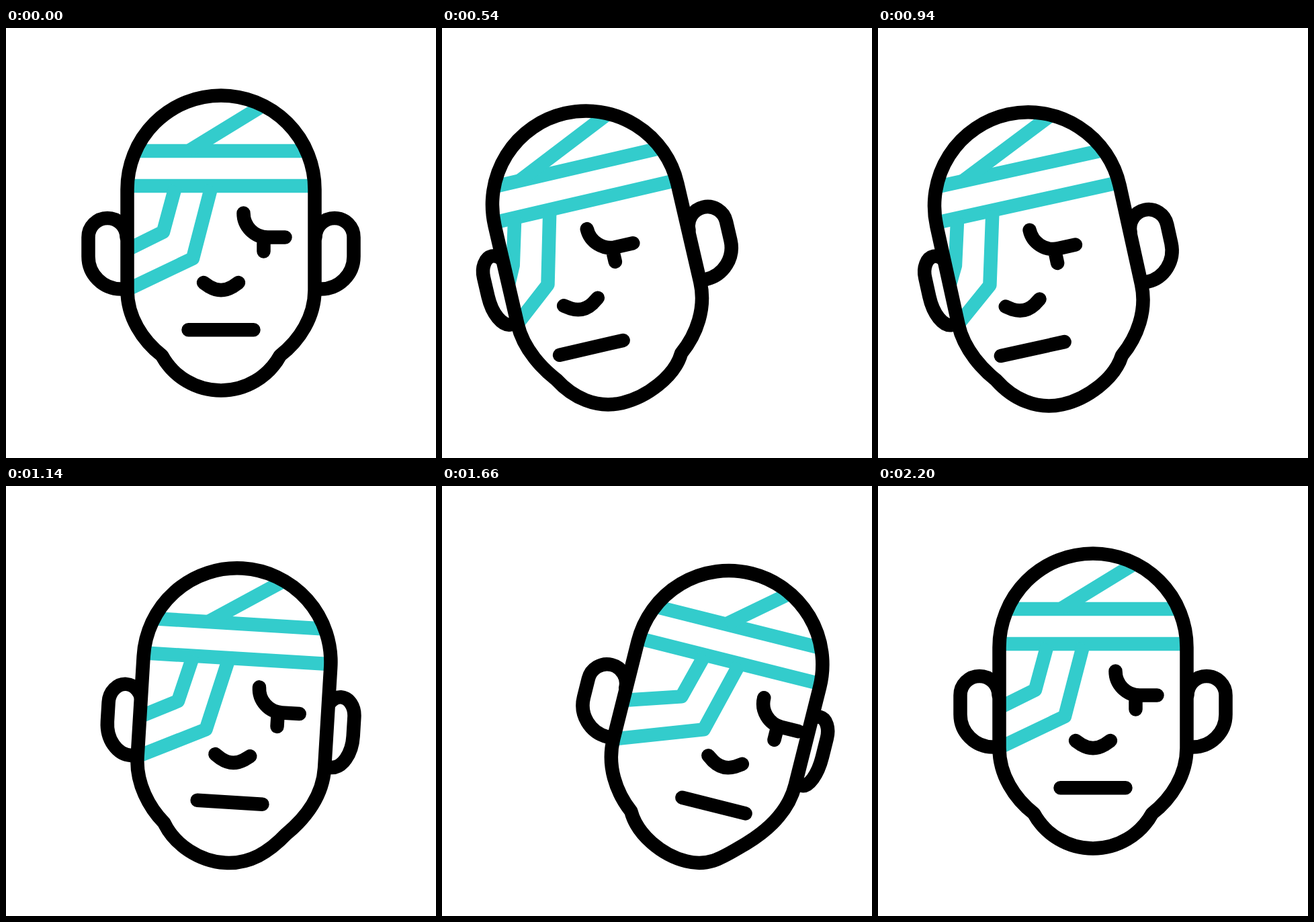
Recreate the animation shown at these times as an HTML page. Size 640 by 640 pixels, loop 2.4 s.

```html
<!DOCTYPE html>
<html lang="en">
<head>
<meta charset="utf-8">
<title>Bandaged head</title>
<style>
  html, body { margin: 0; width: 100%; height: 100%; overflow: hidden; background: #fff; }
  svg { display: block; width: 100%; height: 100%; }
  path { fill: none; stroke: #000; stroke-width: 20.5; stroke-linecap: round; stroke-linejoin: round; }
  #skull { fill: #fff; stroke: none; }
  #tape path { stroke: #3cc; stroke-linecap: butt; }
</style>
</head>
<body>
<svg viewBox="0 0 640 640">
  <clipPath id="inside"><path id="mask"/></clipPath>
  <g id="head">
    <path id="earL"/>
    <path id="earR"/>
    <path id="skull"/>
    <g id="tape" clip-path="url(#inside)">
      <path d="M-150-57H150M-150-5H150"/>
      <path id="strips"/>
    </g>
    <path id="face" d="M33.5 35.5A36 36 0 0 0 69.5 71.5H95.5M63.5 71.5V92.5
      M-26 139L-17 145.2Q0 155.2 17 145.2L26 139M-48.5 209.2H48.5"/>
    <path id="outline"/>
  </g>
</svg>
<script>
const LOOP = 2400, STEP = 20, REST = 2200;
const KEYS = [0, 745, 1500, 2220];
const R = 139.5;      // skull radius
const PIVOT = 200;    // distance from skull centre down to the pivot

// tilt, pivot offset, sideways slide of the face, width of each ear,
// then the chin: lowest point, and end, grip and reach of the curve on each side
const FRONT = {
  tilt: 0, x: 0, y: 0, slide: 0, earL: 1, earR: 1, chin: 0,
  endLx: -88, endLy: 247.5, gripLx: -70.6, gripLy: 279.3, reachL: 36.7,
  endRx: 88, endRy: 247.5, gripRx: 70.6, gripRy: 279.3, reachR: 36.7
};
const LEFT = {
  ...FRONT, tilt: -13.9, x: -59.5, y: 19.2, slide: -43, earL: .55, chin: -15,
  endLx: -103, endLy: 243, gripLx: -85, gripLy: 275, reachL: 40
};
const RIGHT = {
  ...FRONT, tilt: 14.6, x: 57.5, y: 20.4, slide: 30.5, earR: .48, chin: 10,
  endRx: 89.5, endRy: 253, gripRx: 61, gripRy: 280
};

const $ = id => document.getElementById(id);
const set = (id, d) => $(id).setAttribute('d', d);

// cubic-bezier(.8, 0, .2, 1)
function ease(u) {
  if (u <= 0) return 0;
  if (u >= 1) return 1;
  let lo = 0, hi = 1, t;
  for (let i = 0; i < 30; i++) {
    t = (lo + hi) / 2;
    const x = 2.4 * t * (1 - t) ** 2 + .6 * t * t * (1 - t) + t ** 3;
    if (x < u) lo = t; else hi = t;
  }
  return t * t * (3 - 2 * t);
}

function mix(a, b, p) {
  const out = {};
  for (const k in a) out[k] = a[k] + (b[k] - a[k]) * p;
  return out;
}

// Between front and side the pivot follows a curved path.
function lean(side, q) {
  const pose = mix(FRONT, side, q);
  pose.x = side.x * (q + 1.5 * q ** 3 * (1 - q));
  pose.y = side.y * q ** 1.2;
  return pose;
}

function poseAt(ms) {
  if (ms >= REST) return FRONT;
  const i = ms < KEYS[1] ? 0 : ms < KEYS[2] ? 1 : 2;
  const p = ease((ms - KEYS[i]) / (KEYS[i + 1] - KEYS[i]));
  if (i === 0) return lean(LEFT, p);
  if (i === 2) return lean(RIGHT, 1 - p);
  const pose = mix(LEFT, RIGHT, p);
  pose.y += 1.5 * (1 - (2 * p - 1) ** 8);
  return pose;
}

function ear(side, k) {
  const x = d => side * (R + d), turn = side > 0 ? 1 : 0;
  const edge = 58 * k, top = 22 * k + 6.5, foot = 9.5;
  return `M${x(edge - 2 * top)} 71.5A${top} 28.5 0 0 ${turn} ${x(edge)} 71.5V100` +
    `A${edge - foot} 48.5 0 0 ${turn} ${x(foot)} 148.5H${side * R}`;
}

const skull = p =>
  `M${-R} 0A${R} ${R} 0 0 1 ${R} 0V150` +
  `C${R} 190 117 225 ${p.endRx} ${p.endRy}` +
  `C${p.gripRx} ${p.gripRy} ${p.chin + p.reachR} 299.5 ${p.chin} 299.5` +
  `C${p.chin - p.reachL} 299.5 ${p.gripLx} ${p.gripLy} ${p.endLx} ${p.endLy}` +
  `C-117 225 ${-R} 190 ${-R} 150Z`;

// Strips keep their end at the skull edge while the rest slides.
const strips = s =>
  `M${s - 48}-57L63-125` +
  `M${s - 67.5}-5L${s - 86} 63.5L${-R} 90` +
  `M${s - 14}-5L${s - 42} 103L${-R} 149.5`;

function draw(ms) {
  const p = poseAt(ms), d = skull(p);
  $('head').setAttribute('transform',
    `translate(${320 + p.x} ${240 + PIVOT + p.y}) rotate(${p.tilt}) translate(0 ${-PIVOT})`);
  for (const id of ['mask', 'skull', 'outline']) set(id, d);
  set('earL', ear(-1, p.earL));
  set('earR', ear(1, p.earR));
  set('strips', strips(p.slide));
  $('face').setAttribute('transform', `translate(${p.slide} 0)`);
}

const start = performance.now();
function tick() {
  const ms = (performance.now() - start) % LOOP;
  draw(Math.floor(ms / STEP) * STEP);
  requestAnimationFrame(tick);
}
tick();
</script>
</body>
</html>
```
